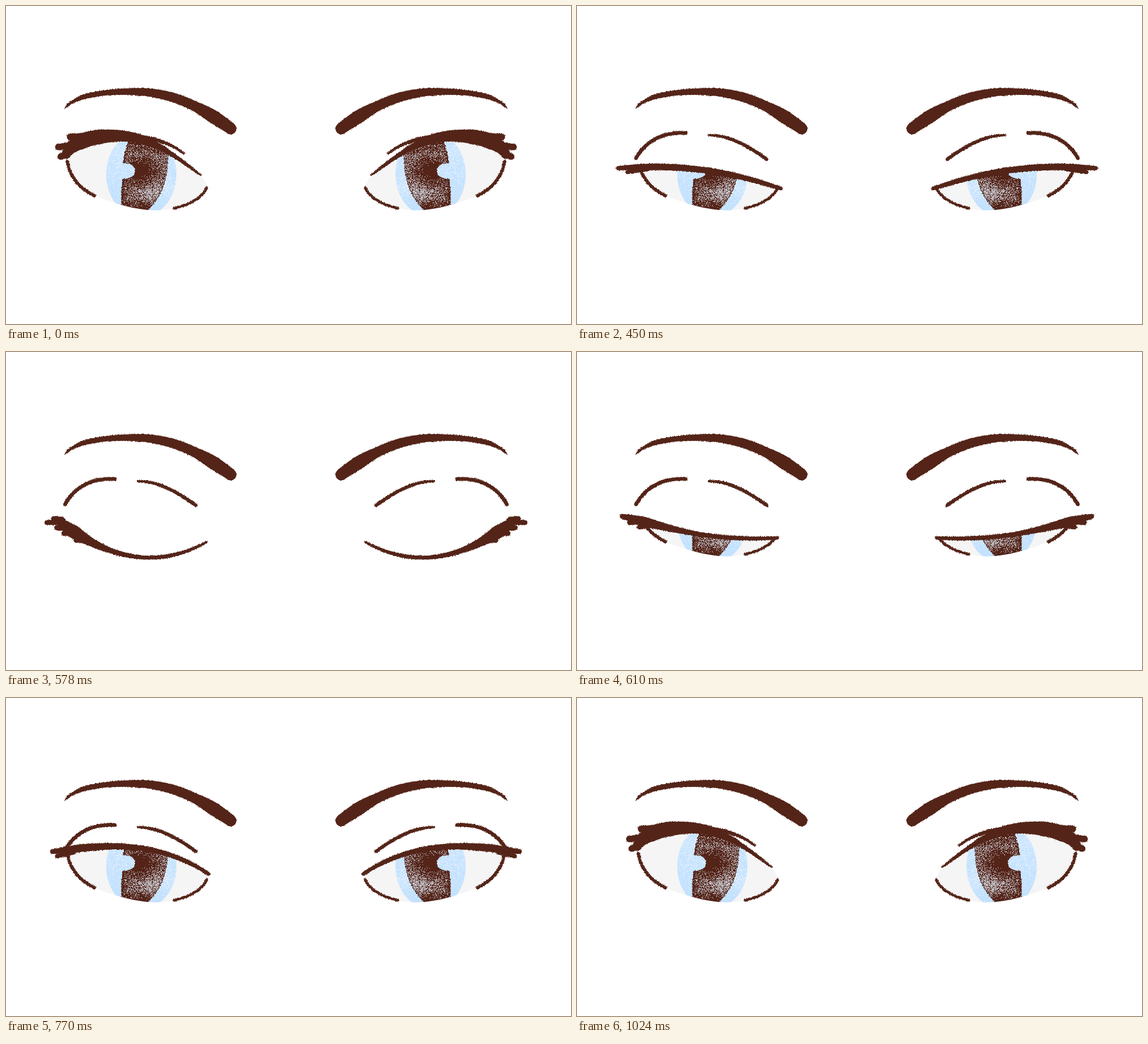
Write an HTML page that moves like this. It is 998 px wide and 561 px high and loops after 1.14 s.

```html
<!DOCTYPE html>
<html lang="en">
<head>
<meta charset="utf-8">
<title>Blinking eyes</title>
<style>
  html, body { margin: 0; width: 100%; height: 100%; overflow: hidden; background: #fff; }
  svg { display: block; width: 998px; height: 561px; }
  .ink { fill: #542418; }
  .grain { fill: none; shape-rendering: crispEdges; }
</style>
</head>
<body>
<svg id="stage" viewBox="0 0 998 561"><defs></defs></svg>
<script>
const LOOP = 1140;
const STEPS = [[0, 'open'], [450, 'half'], [530, 'closed'], [610, 'low'], [690, 'half'], [770, 'wide'], [850, 'open']];
const MIRROR = 'matrix(-1 0 0 1 989 0)';

// Each lid is one brush stroke; its spine also cuts off the eye above it.
const LIDS = {
  open: { spine: 'M106 262C118 236 160 229 195 229C250 229 285 254 345 299', widths: [16, 28, 26, 21, 17, 13, 8, 6, 3],
    lashes: 'M113 231L140 230M91 249L120 245M96 266L112 258', lashWidth: 12 },
  wide: { spine: 'M82 271C170 260 260 246 359 311', widths: [9, 14, 12, 10, 9, 8, 6],
    lashes: 'M90 279L120 272', lashWidth: 8 },
  half: { spine: 'M73 286C160 281 240 282 360 322', widths: [8, 12, 12, 11, 11, 9, 7],
    lashes: 'M89 293L125 288', lashWidth: 7 },
  low: { spine: 'M80 290C150 305 220 335 354 328', widths: [9, 18, 13, 9, 8, 8, 7, 6],
    lashes: 'M93 301L120 299M109 309L130 305', lashWidth: 9 },
  closed: { spine: 'M92 297C160 350 250 393 355 335', widths: [14, 24, 15, 10, 8, 7, 7, 6, 4],
    lashes: 'M72 301L98 300M83 294L100 295M89 310L110 312M102 320L118 320M123 332L140 333', lashWidth: 9 }
};
const OUTER_LINE = 'M108 274C112 298 128 322 157 335';
const INNER_LINE = 'M355 320C346 338 328 350 296 357';
const WHITE = 'M107 272C118 236 160 229 195 229C250 229 285 254 345 299Q357 312 356 320' +
  'C346 338 328 350 296 357C250 368 195 350 157 335C128 322 112 298 107 272Z';
const PUPIL = 'M221 230Q211 250 208 276Q229 277 229 292Q227 305 207 306Q203 330 205 354L245 364' +
  'Q270 342 279 312Q287 285 285 250Z';

const stage = document.getElementById('stage');
const defs = stage.querySelector('defs');

let seed = 7;
function random() {
  seed = (seed * 16807) % 2147483647;
  return seed / 2147483647;
}
const clamp = v => Math.max(0, Math.min(1, v));
const glow = (x, y, cx, cy, rx, ry) => Math.exp(-(((x - cx) / rx) ** 2) - ((y - cy) / ry) ** 2);

const create = tag => document.createElementNS('http://www.w3.org/2000/svg', tag);
function add(parent, tag, attrs = {}) {
  const el = create(tag);
  for (const name in attrs) el.setAttribute(name, attrs[name]);
  return parent.appendChild(el);
}
const clip = (id, d) => add(add(defs, 'clipPath', { id }), 'path', { d });

// Dry brush: round dabs along the spine with loose specks around each rim.
function brush(parent, spine, ...widths) {
  const path = create('path');
  path.setAttribute('d', spine);
  const length = path.getTotalLength();
  let d = '';
  for (let s = 0; s <= length; s += 1.5) {
    const { x, y } = path.getPointAtLength(s);
    const at = s / length * (widths.length - 1), i = Math.floor(at);
    const next = widths[i + 1] ?? widths[i];
    const r = (widths[i] + (next - widths[i]) * (at - i)) / 2 - 0.5 + random() * 0.4;
    d += `M${(x - r).toFixed(1)} ${y.toFixed(1)}a${r} ${r} 0 1 1 ${2 * r} 0a${r} ${r} 0 1 1 ${-2 * r} 0`;
    for (let k = 0; k < 5; k++) {
      const angle = random() * 2 * Math.PI, reach = r + random();
      d += `M${Math.round(x + reach * Math.cos(angle) - 0.5)} ${Math.round(y + reach * Math.sin(angle) - 0.5)}h1v1h-1z`;
    }
  }
  add(parent, 'path', { d, class: 'ink' });
}

function grain(parent, clipId, color, density) {
  let d = '';
  for (let y = 230; y < 364; y++)
    for (let x = 177; x < 302; x++)
      if (random() < density(x, y)) d += `M${x} ${y}.5h1`;
  add(parent, 'path', { d, class: 'grain', stroke: color, 'clip-path': `url(#${clipId})` });
}

const irisGrain = (x, y) => 0.25 * clamp((350 - y) / 60) +
  0.4 * glow(x, y, 282, 322, 18, 18) + 0.15 * glow(x, y, 200, 265, 20, 25);

function pupilGrain(x, y) {
  const ring = 0.36 * clamp((Math.hypot(x - 238, y - 294) - 12) / 26);
  const fade = clamp((358 - y) / 18) * clamp((y - 234) / 25) * clamp((x - 203) / 12);
  return (ring + 0.35 * glow(x, y, 258, 326, 24, 17)) * fade;
}

function buildEye() {
  clip('white', WHITE);
  clip('pupil', PUPIL);
  const iris = { cx: 239, cy: 297, rx: 62, ry: 75 };
  add(add(defs, 'clipPath', { id: 'iris' }), 'ellipse', iris);

  const eye = add(defs, 'g', { id: 'eye' });
  add(eye, 'path', { d: WHITE, fill: '#f5f5f5' });
  const ball = add(eye, 'g', { 'clip-path': 'url(#white)' });
  add(ball, 'ellipse', { ...iris, fill: '#c4e2fe' });
  grain(ball, 'iris', '#e2f0ff', irisGrain);
  add(ball, 'path', { d: PUPIL, class: 'ink' });
  brush(ball, PUPIL, 1.4);
  grain(ball, 'pupil', '#c3c3ca', pupilGrain);
  brush(eye, OUTER_LINE, 5.5);
  brush(eye, INNER_LINE, 4.5);
}

// Draws one side and its reflection.
function pair(parent, id, draw) {
  draw(add(parent, 'g', { id }));
  add(parent, 'use', { href: '#' + id, transform: MIRROR });
}

function buildPose(name, { spine, widths, lashes, lashWidth }) {
  const pose = add(stage, 'g');
  pair(pose, name, side => {
    if (name === 'open') {
      brush(side, 'M235 231Q285 236 315 261', 8, 6, 4);
    } else {
      brush(side, 'M104 269C122 238 150 222 193 224', 6.5);
      brush(side, 'M233 228C268 228 300 245 336 271', 4, 6, 6, 6);
    }
    if (name !== 'closed') {
      clip(name + '-clip', spine + 'L400 400H60Z');
      add(side, 'use', { href: '#eye', 'clip-path': `url(#${name}-clip)` });
    }
    brush(side, spine, ...widths);
    brush(side, lashes, lashWidth);
  });
  const frames = STEPS.map(([at, shown]) => ({ offset: at / LOOP, opacity: shown === name ? 1 : 0, easing: 'step-end' }));
  frames.push({ offset: 1, opacity: name === 'open' ? 1 : 0 });
  pose.animate(frames, { duration: LOOP, iterations: Infinity });
}

buildEye();
pair(stage, 'brow', side =>
  brush(side, 'M105 179C120 163 150 152 215 151S330 167 398 217', 3, 9, 10, 12, 15, 17, 18, 24, 21));
for (const name in LIDS) buildPose(name, LIDS[name]);
</script>
</body>
</html>
```
